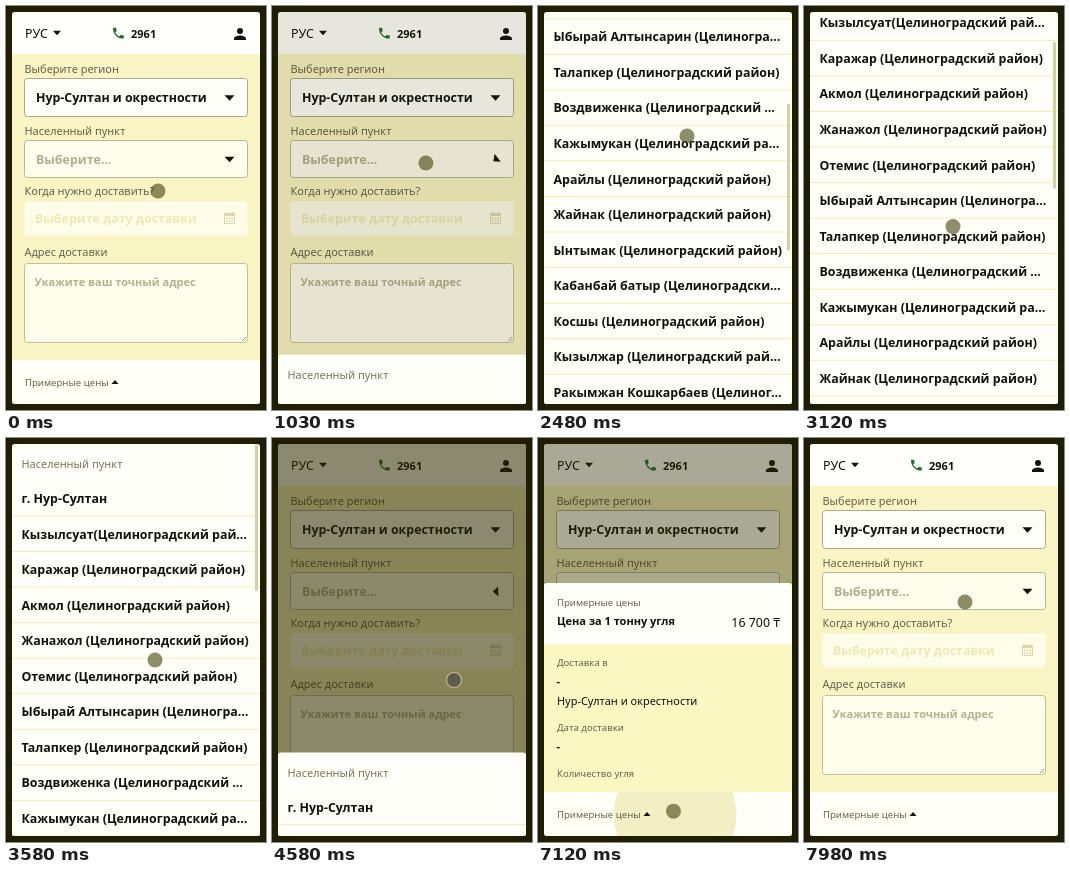
These frames come from a looping animation (260 by 404 pixels, 8.01 s). An HTML page with a canvas:

```html
<!DOCTYPE html>
<html lang="ru">
<head>
<meta charset="utf-8">
<title>Форма заказа</title>
<style>
html, body { margin: 0; width: 100%; height: 100%; overflow: hidden; background: #1f1d02; }
canvas { display: block; width: 260px; height: 404px; }
</style>
</head>
<body>
<canvas id="stage"></canvas>
<script>
const W = 260, H = 404, LOOP = 8010;
const FONT = '"Noto Sans", "Open Sans", sans-serif';
const INK = '#11110a', LABEL = '#63624a', PALE = '#f8f4c3', PAPER = '#fffffa';
const ROW = 35.55;

const canvas = document.getElementById('stage');
const ctx = canvas.getContext('2d');
const ratio = window.devicePixelRatio || 1;
canvas.width = W * ratio;
canvas.height = H * ratio;

const district = ' (Целиноградский район)';
const places = [
  'г. Нур-Султан', 'Кызылсуат(Целиноградский рай…', 'Каражар' + district,
  'Акмол' + district, 'Жанажол' + district, 'Отемис' + district,
  'Ыбырай Алтынсарин (Целиногра…', 'Талапкер' + district,
  'Воздвиженка (Целиноградский …', 'Кажымукан (Целиноградский ра…',
  'Арайлы' + district, 'Жайнак' + district, 'Ынтымак' + district,
  'Кабанбай батыр (Целиноградски…', 'Косшы' + district,
  'Кызылжар (Целиноградский рай…', 'Ракымжан Кошкарбаев (Целиног…'
];

const phone = new Path2D('M6.6 10.8c1.4 2.8 3.8 5.1 6.6 6.6l2.2-2.2c.3-.3.7-.4 1-.2 1.1.4 2.3.6 3.6.6.5 0 1 .4 1 1V20c0 .5-.5 1-1 1C10.600 21 3 13.400 3 4c0-.5.5-1 1-1h3.500c.5 0 1 .5 1 1 0 1.200.2 2.400.6 3.600.1.3 0 .7-.3 1z');
const person = new Path2D('M12 12a4 4 0 1 0 0-8a4 4 0 0 0 0 8zM12 14c-2.700 0-8 1.300-8 4v2h16v-2c0-2.700-5.300-4-8-4z');

// Keyed values: [time, value], eased between neighbours
const ease = u => u * u * (3 - 2 * u);
function keyed(keys, t) {
  if (t <= keys[0][0]) return keys[0][1];
  for (let i = 1; i < keys.length; i++) {
    const [a, from] = keys[i - 1], [b, to] = keys[i];
    if (t < b) return from + (to - from) * ease((t - a) / (b - a));
  }
  return keys[keys.length - 1][1];
}

const track = {
  x: [[0, 152], [800, 154], [1000, 154], [1500, 144], [1750, 144], [2250, 149], [3700, 149], [4100, 170], [4500, 182], [4740, 182], [5300, 135], [7050, 135], [7940, 161]],
  y: [[0, 185], [800, 156], [1000, 156], [1500, 243], [1720, 243], [2300, 130], [2750, 130], [3150, 222], [3750, 222], [4100, 135], [4250, 135], [4540, 242], [4740, 242], [5300, 377], [7050, 377], [7940, 164]],
  scroll: [[1720, 0], [2440, 243], [2750, 243], [3350, 0]],
  bar: [[1720, 0], [1820, 1], [3700, 1], [3950, 0]],
  list: [[960, 392], [1280, 0], [4300, 0], [4700, 392]],
  listDim: [[960, 0], [1200, 1], [4580, 1], [4790, 0]],
  turn: [[960, 0], [1160, 1], [4500, 1], [4660, 0]],
  price: [[5400, 284], [5710, 0], [7020, 0], [7320, 284]],
  priceDim: [[5400, 0], [5650, 1], [7020, 0.999], [7320, 0]]
};

function text(str, x, y, size, color, weight = 400, align = 'left') {
  ctx.font = `${weight} ${size}px ${FONT}`;
  ctx.fillStyle = color;
  ctx.textAlign = align;
  ctx.fillText(str, x, y);
}
const label = (str, x, y) => text(str, x, y, 10.95, LABEL);
const small = (str, y) => text(str, 19, y, 9.55, LABEL);

function rect(x, y, w, h, color) {
  ctx.fillStyle = color;
  ctx.fillRect(x, y, w, h);
}

function roundPath(x, y, w, h, r) {
  ctx.beginPath();
  ctx.moveTo(x + r, y);
  ctx.arcTo(x + w, y, x + w, y + h, r);
  ctx.arcTo(x + w, y + h, x, y + h, r);
  ctx.arcTo(x, y + h, x, y, r);
  ctx.arcTo(x, y, x + w, y, r);
  ctx.closePath();
}

function box(x, y, w, h, fill, line) {
  roundPath(x + 0.5, y + 0.5, w - 1, h - 1, 3);
  ctx.fillStyle = fill;
  ctx.fill();
  if (line) {
    ctx.strokeStyle = line;
    ctx.lineWidth = 1;
    ctx.stroke();
  }
}

function arrow(x, y, w, h, angle = 0) {
  ctx.save();
  ctx.translate(x, y);
  ctx.rotate(angle);
  ctx.beginPath();
  ctx.moveTo(-w / 2, -h / 2);
  ctx.lineTo(w / 2, -h / 2);
  ctx.lineTo(0, h / 2);
  ctx.fillStyle = INK;
  ctx.fill();
  ctx.restore();
}

function icon(path, x, y, scale, color) {
  ctx.save();
  ctx.translate(x, y);
  ctx.scale(scale, scale);
  ctx.fillStyle = color;
  ctx.fill(path);
  ctx.restore();
}

function calendar(x, y) {
  const color = '#ddd8a6';
  ctx.strokeStyle = color;
  ctx.lineWidth = 1;
  ctx.strokeRect(x + 0.5, y + 1.5, 10, 10);
  rect(x, y + 1, 11, 3, color);
  rect(x + 2, y, 1.5, 2, color);
  rect(x + 7.5, y, 1.5, 2, color);
  for (let i = 0; i < 6; i++) rect(x + 2 + i % 3 * 2.7, y + 5.5 + (i > 2 ? 3 : 0), 1.6, 1.6, color);
}

function form(turn) {
  rect(6, 6, 248, 42, '#fffffc');
  rect(6, 48, 248, 306, PALE);
  text('РУС', 19, 32, 12.4, INK);
  arrow(51, 27, 8, 4.5);
  icon(phone, 105.2, 20, 0.6, '#21702c');
  text('2961', 125, 31.5, 11, INK, 700);
  icon(person, 225, 19, 0.75, INK);

  label('Выберите регион', 18.5, 67);
  box(18, 72, 224, 39, PAPER, '#aaa98a');
  text('Нур-Султан и окрестности', 30, 96, 12.4, INK, 700);
  arrow(223.5, 92, 10, 5.5);

  label('Населенный пункт', 18.5, 129);
  box(18, 134, 224, 38, '#fffdec', '#b9b797');
  text('Выберите...', 30, 157.5, 12.4, '#b0ae91', 700);
  arrow(223.5, 153.5, 10, 5.5, Math.PI * turn);

  label('Когда нужно доставить?', 18.5, 189);
  box(18, 195, 224, 35, '#fffde9');
  text('Выберите дату доставки', 29, 217, 12.4, '#eee9b4', 700);
  calendar(218, 206);

  label('Адрес доставки', 18.5, 250);
  box(18, 257, 224, 80, '#fffdec', '#c2bf9b');
  text('Укажите ваш точный адрес', 28.5, 280, 11, '#b3b18f', 700);
  ctx.strokeStyle = '#8b896c';
  ctx.lineWidth = 0.8;
  ctx.beginPath();
  ctx.moveTo(236, 335); ctx.lineTo(240, 331);
  ctx.moveTo(238.500, 335); ctx.lineTo(240, 333.500);
  ctx.stroke();
}

function ripple(t, start) {
  const u = (t - start) / 420;
  if (u < 0 || t > start + 750) return;
  const fade = t < start + 450 ? 1 : 1 - (t - start - 450) / 300;
  ctx.beginPath();
  ctx.arc(137, 377, 110 * Math.sqrt(Math.min(1, u)), 0, 7);
  ctx.fillStyle = `rgba(205,195,60,${0.27 * fade})`;
  ctx.fill();
}

function footer(t) {
  ctx.save();
  ctx.beginPath();
  ctx.rect(6, 354, 248, 44);
  ctx.clip();
  rect(6, 354, 248, 44, '#fffff8');
  ripple(t, 5370);
  ripple(t, 6990);
  small('Примерные цены', 379.5);
  arrow(109, 376, 7, 4, Math.PI);
  ctx.restore();
}

function dim(amount) {
  rect(6, 6, 248, 392, `rgba(45,42,0,${0.55 * amount})`);
}

function listSheet(top, scroll, bar) {
  ctx.save();
  roundPath(6, 6 + top, 248, 400, 3);
  ctx.fillStyle = PAPER;
  ctx.fill();
  ctx.clip();
  const y = top - scroll;
  text('Населенный пункт', 15.5, 30 + y, 10.95, '#77755a');
  places.forEach((name, i) => {
    const base = y + ROW * i;
    text(name, 15.5, 65 + base, 12.4, INK, 700);
    rect(6, 77.5 + base, 248, 1, '#f1edb9');
  });
  if (bar > 0) {
    ctx.globalAlpha = bar;
    roundPath(249, 6 + top + scroll * 0.377, 3, 147, 1.5);
    ctx.fillStyle = '#d3d0a4';
    ctx.fill();
  }
  ctx.restore();
}

function priceSheet(drop) {
  ctx.save();
  ctx.beginPath();
  ctx.rect(6, 6, 248, 348);
  ctx.clip();
  ctx.translate(0, drop);
  roundPath(6, 70, 248, 300, 3);
  ctx.fillStyle = '#fffffa';
  ctx.fill();
  rect(6, 131, 248, 240, '#fbf7c3');
  small('Примерные цены', 93.5);
  text('Цена за 1 тонну угля', 19, 112, 11, INK, 700);
  text('16 700 ₸', 242, 114, 12.4, INK, 400, 'right');
  const rows = [['Доставка в', 150], ['Дата доставки', 215], ['Количество угля', 261], ['Заказчик', 306], ['Способ оплаты', 352]];
  rows.forEach(([name, y]) => {
    small(name, y + 3.5);
    text('-', 18.5, y + 22.5, 11, INK, 700);
  });
  text('Нур-Султан и окрестности', 19, 192, 10.95, INK);
  ctx.restore();
}

function cursor(x, y, pressed) {
  ctx.beginPath();
  ctx.arc(x, y, 7.5, 0, 7);
  ctx.fillStyle = pressed ? 'rgba(85,85,72,.85)' : 'rgba(80,77,25,.64)';
  ctx.fill();
  if (pressed) {
    ctx.strokeStyle = '#bdba96';
    ctx.lineWidth = 1.2;
    ctx.stroke();
  }
}

function draw(t) {
  const v = {};
  for (const name in track) v[name] = keyed(track[name], t);
  ctx.setTransform(ratio, 0, 0, ratio, 0, 0);
  rect(0, 0, W, H, '#1f1d02');
  ctx.save();
  roundPath(6, 6, 248, 392, 2.5);
  ctx.clip();
  form(v.turn);
  if (v.priceDim > 0) {
    dim(v.priceDim);
    priceSheet(v.price);
  }
  footer(t);
  if (v.listDim > 0) {
    dim(v.listDim);
    listSheet(v.list, v.scroll, v.bar);
  }
  cursor(v.x, v.y, t > 4250 && t < 4650);
  ctx.restore();
}

const start = performance.now();
function tick(now) {
  draw(Math.max(0, now - start) % LOOP);
  requestAnimationFrame(tick);
}
draw(0);
requestAnimationFrame(tick);
</script>
</body>
</html>
```
